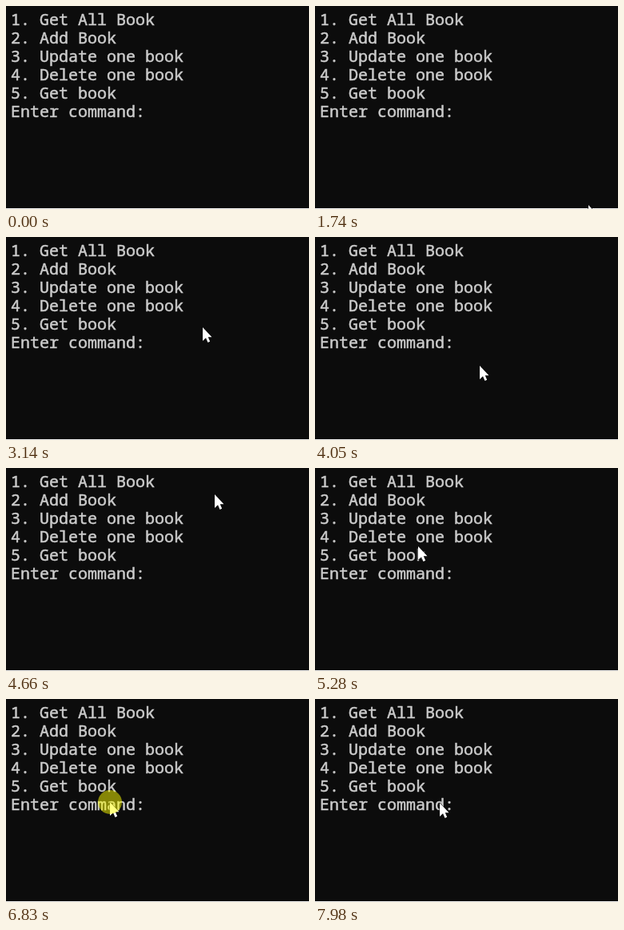
Recreate the animation shown at these times as an HTML page. Size 379 by 254 pixels, loop 8 s.

```html
<!DOCTYPE html>
<html lang="en">
<head>
<meta charset="utf-8">
<style>
  html, body { margin: 0; width: 100%; height: 100%; overflow: hidden; background: #0c0c0c; }
  svg { display: block; }
  text { font: 20px "Noto Sans Mono", "DejaVu Sans Mono", monospace; fill: #ccc; stroke: #ccc; stroke-width: .5; }
  #pointer { fill: #fff; stroke: #000; stroke-width: 1; paint-order: stroke; }
</style>
</head>
<body>
<svg width="379" height="254" viewBox="0 0 379 254">
  <rect width="379" height="254" fill="#0c0c0c"/>
  <rect y="253" width="379" height="1" fill="#f2f2f2"/>
  <text x="6" y="24">1. Get All Book</text>
  <text x="6" y="47">2. Add Book</text>
  <text x="6" y="70">3. Update one book</text>
  <text x="6" y="93">4. Delete one book</text>
  <text x="6" y="116">5. Get book</text>
  <text x="6" y="139">Enter command:</text>
  <rect id="caret" x="186" y="121" width="1" height="23" fill="#fff"/>
  <path id="pointer" d="M0 0V17L4 13.3 6.5 19 9.2 17.8 6.8 12.2H11.5Z"/>
  <circle id="click" cx="130" cy="129" r="15" fill="#ff0" fill-opacity=".5"/>
</svg>
<script>
const LOOP = 8000, STEP = 66;
const [caret, pointer, click] = ['caret', 'pointer', 'click'].map(id => document.getElementById(id));

// Pointer glides: start ms, end ms, destination x, y.
const glides = [
  [0, 0, 329, 256],
  [500, 840, 327, 241],
  [1120, 1360, 343, 256],
  [1620, 1740, 342, 249],
  [1990, 2450, 334, 152],
  [2450, 2680, 322, 206],
  [2870, 3200, 246, 113],
  [3200, 3400, 236, 79],
  [3600, 3760, 205, 164],
  [4050, 4800, 263, 28],
  [4880, 4950, 271, 10],
  [4950, 5340, 129, 98],
  [5340, 5660, 124, 114],
  [5730, 5810, 128, 128],
  [6000, 6060, 130, 129],
  [7670, 7980, 156, 130],
];

const smooth = u => u * u * (3 - 2 * u);

// The pointer advances in discrete steps, the first one at the start of a glide.
function pointerAt(t) {
  const i = glides.findLastIndex(g => g[0] <= t);
  const [start, end, ...to] = glides[i];
  const from = (glides[i - 1] || glides[0]).slice(2);
  const elapsed = (Math.floor((t - start) / STEP) + 1) * STEP;
  const k = smooth(Math.min(1, elapsed / (end - start)));
  return to.map((v, n) => Math.round(from[n] + (v - from[n]) * k));
}

const show = (el, on) => el.setAttribute('visibility', on ? 'visible' : 'hidden');

function draw() {
  const t = performance.now() % LOOP;
  pointer.setAttribute('transform', `translate(${pointerAt(t)})`);
  show(click, t >= 6830 && t < 6980);
  show(caret, t >= 7190 && t < 7720);
  requestAnimationFrame(draw);
}
draw();
</script>
</body>
</html>
```
